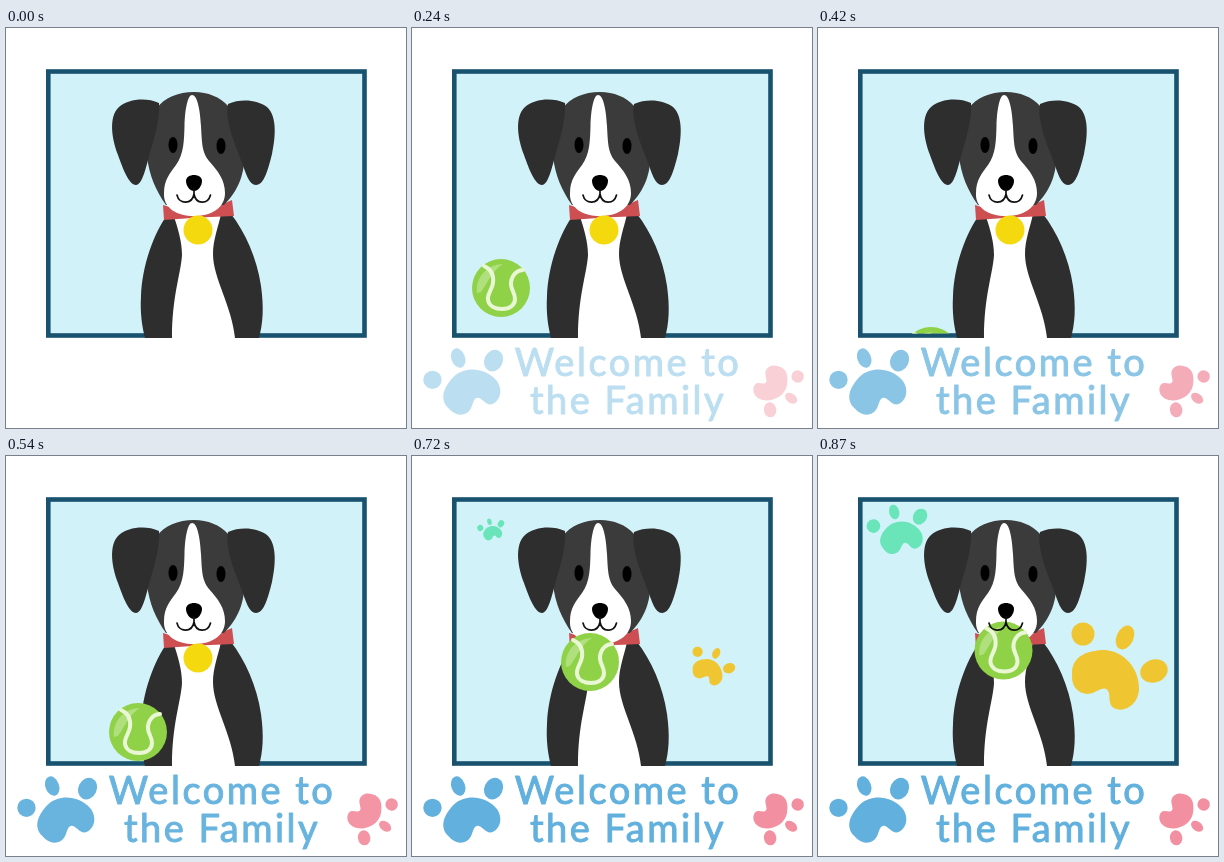
An HTML page with a canvas for the animation above (900 ms loop, 400 by 400 pixels).

```html
<!DOCTYPE html>
<html lang="en">
<head>
<meta charset="utf-8">
<title>Welcome to the Family</title>
<style>
  html, body { margin: 0; width: 100%; height: 100%; overflow: hidden; background: #fff; }
  canvas { display: block; width: 400px; height: 400px; }
</style>
</head>
<body>
<canvas id="stage" width="400" height="400"></canvas>
<script>
const ctx = document.getElementById('stage').getContext('2d');
const LOOP = 900, STEP = 30, FADE_END = 570, GROW_START = 600, GROW_END = 870;

const BLUE = [97, 176, 221], PINK = [242, 143, 160];
const COAT = '#2e2e2e', HEAD = '#3b3b3b', FRAME = '#18526f';

// Ball path: time, x, y
const BALL_PATH = [
  [0, 10, 145], [120, 52, 196], [240, 89, 260], [340, 105, 312], [390, 110, 332],
  [420, 113, 328], [540, 132, 276], [720, 178, 206], [870, 185.5, 194.5]
];

// One paw print, placed with position, angle and size
const PAD = 'M-48 7C-48 -10 -32 -16 -15 -16C4 -15 20 3 19 24C18 38 6 46 -4 43C-13 40 -9 30 -12 25C-16 18 -24 28 -33 28C-43 27 -49 20 -48 7Z';
const TOES = [[-37, -32, 11.5, 11.5, 0], [5, -28.5, 8.5, 12.5, 25], [34, 5, 14, 11.5, -20]];
const paws = {
  blue: { x: 59.5, y: 349, angle: -45, size: 0.8 },
  pink: { x: 364.6, y: 364.4, angle: 102, size: 0.54 },
  green: { x: 84.5, y: 71, angle: -39, size: 0.594, pivot: [78.5, 73.5], color: '#69e5b9' },
  yellow: { x: 302, y: 210, angle: 0, size: 1, pivot: [302, 210], color: '#efc632' }
};

const clamp = v => Math.max(0, Math.min(1, v));
const tint = (rgb, a) => `rgb(${rgb.map(c => Math.round(255 + (c - 255) * a))})`;
const radians = degrees => degrees * Math.PI / 180;

function fill(path, color) {
  ctx.fillStyle = color;
  ctx.fill(new Path2D(path));
}

function line(path, color, width) {
  ctx.strokeStyle = color;
  ctx.lineWidth = width;
  ctx.lineCap = ctx.lineJoin = 'round';
  ctx.stroke(new Path2D(path));
}

function oval(x, y, rx, ry, color, tilt = 0) {
  ctx.fillStyle = color;
  ctx.beginPath();
  ctx.ellipse(x, y, rx, ry, radians(tilt), 0, Math.PI * 2);
  ctx.fill();
}

function drawPaw({ x, y, angle, size }, color) {
  ctx.save();
  ctx.translate(x, y);
  ctx.rotate(radians(angle));
  ctx.scale(size, size);
  fill(PAD, color);
  for (const [tx, ty, rx, ry, tilt] of TOES) oval(tx, ty, rx, ry, color, tilt);
  ctx.restore();
}

function drawGrowingPaw(paw, scale) {
  const [px, py] = paw.pivot;
  ctx.save();
  ctx.translate(px, py);
  ctx.scale(scale, scale);
  ctx.translate(-px, -py);
  drawPaw(paw, paw.color);
  ctx.restore();
}

function drawDog() {
  fill('M162 186C148 204 136 238 135 268C134 285 136 298 139 310H253C257 295 258 280 255 258C251 230 239 204 225 186Z', COAT);
  fill('M167 186C172 200 176 214 176 227C175 245 166 268 166 310H229C226 278 207 250 207 226C207 212 212 200 215 186Z', '#fff');
  fill('M157 177L170 181L190 186L212 178L226 172L228 188L193 189.5L158 192Z', '#cd4f52');
  fill('M188 64C172 64 158 70 151 80C142 94 139 112 141 128C143 147 150 163 160 177H218C232 163 240 145 238 122C235 105 230 90 222 78C214 69 202 64 188 64Z', HEAD);
  fill('M186 67C191 67 194 80 195 98C196 116 196 124 203 133C212 143 219 152 219 165C219 181 204 188 188 188C171 188 157 180 158 165C158 152 164 145 170 137C178 126 178 112 178.5 98C179 80 182 67 186 67Z', '#fff');
  fill('M153 75C140 69 122 71 113 79C102 89 106 112 112 127C117 141 123 157 130 157C136 157 140 140 143 128C149 108 154 90 153 75Z', COAT);
  fill('M222 76C235 70 252 72 261 79C272 89 269 112 266 126C262 142 258 157 250 157C243 157 240 146 235 132C228 114 219 92 222 76Z', COAT);
  oval(167, 117, 4.5, 8, '#000');
  oval(215, 118, 4.5, 8, '#000');
  fill('M180 153C180 145 196 145 196 153C196 158 192 163 188 163C184 163 180 158 180 153Z', '#000');
  oval(192, 202, 14.5, 14.5, '#f5d90f');
}

function drawSmile() {
  line('M171 167C173 176.5 186 177 188 166C190 177 202 176.5 204.5 167M188 161V166', '#111', 1.7);
}

// Cubic interpolation with averaged slopes, at rest on the last point
function ballAt(t) {
  const last = BALL_PATH.length - 1;
  if (t >= BALL_PATH[last][0]) return BALL_PATH[last].slice(1);
  const i = BALL_PATH.findIndex((p, n) => n < last && t < BALL_PATH[n + 1][0]);
  const a = BALL_PATH[i], b = BALL_PATH[i + 1], span = b[0] - a[0];
  const s = (t - a[0]) / span;
  const slope = (n, k) => {
    if (n === last) return 0;
    const p = BALL_PATH[Math.max(0, n - 1)], q = BALL_PATH[n + 1];
    return (q[k] - p[k]) / (q[0] - p[0]) * span;
  };
  return [1, 2].map(k => {
    const blend = s * s * (3 - 2 * s);
    return a[k] + (b[k] - a[k]) * blend
      + slope(i, k) * s * (1 - s) ** 2 - slope(i + 1, k) * s * s * (1 - s);
  });
}

function drawBall(t) {
  const [x, y] = ballAt(t);
  ctx.save();
  ctx.translate(x, y);
  ctx.rotate(-0.35 * clamp((240 - t) / 120));
  oval(0, 0, 29, 29, '#8fd147');
  fill('M-24 5C-26 -10 -14 -24 2 -24C-8 -18 -13 -6 -20 4Z', '#b0df7d');
  line('M-17 -22C-10 -19 -7 -13 -8 -5C-9 2 -14 6 -13 12C-12 18 -6 21 1 21C9 21 14 17 14 11C14 4 9 1 10 -6C11 -13 16 -18 22 -18', '#e9f7d5', 4);
  ctx.restore();
}

function drawGreeting(alpha) {
  const blue = tint(BLUE, alpha);
  drawPaw(paws.blue, blue);
  drawPaw(paws.pink, tint(PINK, alpha));
  ctx.font = '400 38px Lato, "Open Sans", sans-serif';
  ctx.letterSpacing = '2.5px';
  ctx.textAlign = 'center';
  ctx.fillStyle = ctx.strokeStyle = blue;
  ctx.lineWidth = 1;
  ctx.lineJoin = 'round';
  [['Welcome to', 348], ['the Family', 386]].forEach(([text, y]) => {
    ctx.fillText(text, 216, y);
    ctx.strokeText(text, 216, y);
  });
}

function drawFrame() {
  ctx.strokeStyle = FRAME;
  ctx.lineWidth = 4.6;
  ctx.lineJoin = 'miter';
  ctx.strokeRect(42.3, 43.5, 316.2, 264);
}

function draw(t) {
  ctx.fillStyle = '#fff';
  ctx.fillRect(0, 0, 400, 400);
  ctx.fillStyle = '#d1f2f9';
  ctx.fillRect(42, 43, 317, 265);
  drawFrame();
  drawDog();
  const grow = clamp((t - GROW_START) / (GROW_END - GROW_START));
  if (grow > 0) {
    drawGrowingPaw(paws.green, grow);
    drawGrowingPaw(paws.yellow, grow);
  }
  ctx.save();
  ctx.beginPath();
  ctx.rect(44.5, 45.5, 312, 260);
  ctx.clip();
  drawBall(t);
  ctx.restore();
  drawSmile();
  if (t > 0) drawGreeting(clamp(t / FADE_END));
}

const start = performance.now();
function tick() {
  const t = (performance.now() - start) % LOOP;
  draw(Math.floor(t / STEP) * STEP);
  requestAnimationFrame(tick);
}
tick();
</script>
</body>
</html>
```
